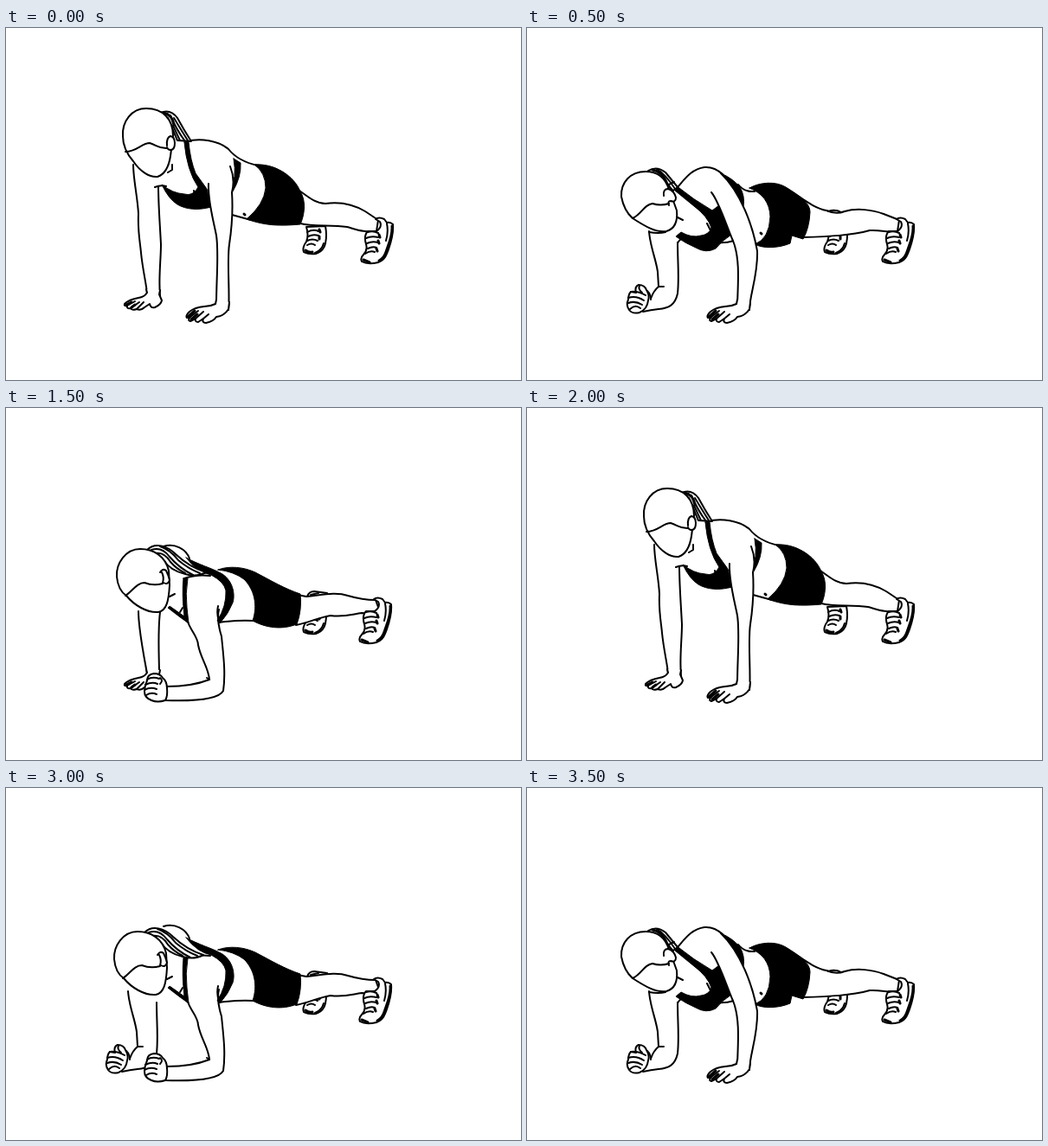
Recreate the animation shown at these times as an HTML page. Size 595 px wide and 407 px high, loop 4000 ms.

```html
<!DOCTYPE html>
<html lang="en">
<head>
<meta charset="utf-8">
<title>Up-down plank</title>
<style>
  html, body { margin: 0; width: 100%; height: 100%; overflow: hidden; background: #fff; }
  svg { display: block; width: 595px; height: 407px; }
  path { fill: none; stroke: #000; stroke-width: 2; stroke-linecap: round; stroke-linejoin: round; }
  .skin { fill: #fff; }
  .cover { fill: #fff; stroke: none; }
  .ink { fill: #000; stroke-width: 1; }
  .bold { stroke-width: 3; }
  .pose { visibility: hidden; animation: 4s step-end infinite; }
  #high { animation-name: high; }
  #left { animation-name: left; }
  #low { animation-name: low; }
  #right { animation-name: right; }
  @keyframes high {
    0%, 50% { visibility: visible; }
    12.5%, 62.5%, 100% { visibility: hidden; }
  }
  @keyframes left {
    0%, 25% { visibility: hidden; }
    12.5%, 87.5%, 100% { visibility: visible; }
  }
  @keyframes low {
    0%, 37.5%, 87.5%, 100% { visibility: hidden; }
    25%, 75% { visibility: visible; }
  }
  @keyframes right {
    0%, 50%, 75%, 100% { visibility: hidden; }
    37.5%, 62.5% { visibility: visible; }
  }
</style>
</head>
<body>
<svg viewBox="0 0 595 407">
  <defs>
    <g id="shoe">
      <path class="skin" d="M427 221Q431 218 437 221L440 225Q444 224 447 227C448 238 444 251 440 261Q437 269 430 271Q418 274 411 270Q409 266 413 262Q418 257 416 250Q413 240 418 235L428 235Q435 230 432 224Z"/>
      <path class="bold" d="M446 229C447 240 442 250 439 259Q437 266 431 269"/>
      <path d="M440 226Q442 236 439 246M418 236Q424 234 430 237M416 243Q422 240 430 242M417 249Q423 246 430 248M418 255Q424 252 428 254M415 261Q421 257 426 259"/>
      <path class="bold" d="M431 239L432 242M430 246L431 249M428 255L429 258M413 268L420 271"/>
    </g>
    <g id="back-shoe">
      <path class="skin" d="M347 230Q350 240 347 247Q342 254 344 259Q350 262 358 261Q367 258 369 249Q371 240 369 229Z"/>
      <path d="M348 236Q355 232 361 235M349 241Q355 238 361 240M348 246Q354 243 360 246M348 251Q353 248 357 251M367 249Q365 257 357 260"/>
      <path class="bold" d="M362 233L363 236M362 241L362 244M346 257Q350 260 354 259"/>
    </g>
    <g id="far-hand">
      <path class="skin" d="M162 302L163 306Q160 311 153 312Q142 314 137 319Q136 322 140 321Q139 325 144 324Q145 327 151 325Q156 327 160 323L166 319Q167 324 172 323Q179 320 180 315L177 308L178 303"/>
      <path d="M140 321L149 316M144 324L154 317M151 325L159 317"/>
      <path class="bold" d="M139 320L145 317M145 323L149 320"/>
    </g>
    <g id="near-hand">
      <path class="skin" d="M243 314L242 319Q236 322 229 322Q218 323 212 328Q207 333 209 335L213 334Q209 338 213 339L219 336Q218 340 222 340L228 336Q226 341 231 341Q240 339 243 334Q252 333 257 325L258 317"/>
      <path d="M213 334L222 327M219 336L228 328M228 336L234 331"/>
      <path class="bold" d="M210 334L218 327M214 337L221 331"/>
    </g>
    <g id="far-forearm">
      <path class="cover" d="M141 235L152 298L140 304L134 328L157 324L173 309L174 246Z"/>
      <path d="M141 235C142 252 149 267 151 282L152 299Q146 304 143 313M152 299L158 299M174 248C174 270 176 289 174 307C171 321 163 324 152 325Q143 326 134 328"/>
      <path class="skin" d="M126 306Q124 299 129 297Q136 297 138 303Q142 309 140 315Q139 325 130 329Q122 331 118 326Q114 320 117 314Q117 308 120 305Z"/>
      <path d="M120 305Q128 304 137 309M117 312Q126 309 135 315M117 318Q125 315 133 320M119 325Q125 319 131 324M130 298Q128 302 133 306M139 304Q143 308 143 314"/>
    </g>
    <g id="far-arm">
      <path class="skin" d="M153 235C153 255 158 280 163 307L177 309C177 288 175 260 178 236"/>
    </g>
    <g id="bent-arm">
      <path class="cover" d="M207 197Q222 191 236 195L250 213L247 232L248 262L251 325L234 314L222 275L210 245Z"/>
      <path class="skin" d="M210 247C213 257 222 265 222 274C225 290 234 300 235 314C220 320 202 322 186 322L184 338C212 339 245 338 251 327C254 306 251 285 249 264Q243 245 246 233"/>
      <path d="M235 314L232 312M245 229Q243 238 246 246"/>
      <path class="skin" d="M163 315Q163 308 171 307Q178 307 181 312Q186 316 186 324Q187 333 184 338Q175 341 168 338Q160 335 160 328Q160 322 163 315Z"/>
      <path d="M163 314Q169 310 177 313M161 320Q169 316 175 319M160 326Q167 322 174 325M162 332Q168 328 174 331M178 312Q182 315 178 319"/>
    </g>
    <g id="low-legs">
      <path class="skin" d="M348 218Q350 212 356 212L371 214Q372 218 366 221"/>
      <use href="#back-shoe"/>
      <path class="skin" d="M326 214L347 218C362 217 380 212 395 217Q412 222 427 222L431 233Q420 238 411 237C398 239 390 242 375 240C362 242 350 248 335 251Z"/>
      <path d="M352 216L361 214"/>
      <use href="#shoe" x="-2"/>
    </g>
    <g id="low-body">
      <path class="cover" d="M184 166Q198 157 212 174L250 190L290 200L286 246L246 248L210 247L188 230Z"/>
      <path d="M182 160C195 156 208 163 212 174M246 248Q266 245 287 246"/>
      <path class="ink" d="M245 187C258 182 275 184 288 190C307 200 322 209 340 215Q342 234 336 250C318 257 300 254 285 246C291 228 287 210 275 198Q263 189 245 187Z"/>
    </g>
    <g id="low-top">
      <path class="ink" d="M208 173C222 181 238 185 250 192C262 200 265 215 262 225Q257 238 247 249L244 246Q255 229 254 211Q252 201 237 193Q221 190 208 173Z"/>
      <path d="M206 197Q220 192 236 194"/>
      <path class="ink" d="M205 197L210 197Q207 215 209 231L211 249L200 241L187 231L189 229L206 241Q203 215 205 197Z"/>
      <path d="M201 236L204 231"/>
    </g>
    <g id="low-head">
      <path class="skin" d="M163 164C172 155 186 159 196 169Q212 184 231 190Q220 196 207 192Q190 188 182 176"/>
      <path d="M168 164Q180 160 189 172Q200 185 216 193M172 168Q183 166 190 178Q197 186 207 191M178 160Q190 164 199 176Q211 186 224 191"/>
      <path class="skin" d="M188 188C184 171 170 163 155 163C138 163 127 180 128 195C129 206 133 213 139 217C148 228 163 237 176 236C186 234 188 222 189 205Z"/>
      <path d="M138 217C146 212 151 202 160 202Q170 206 181 203M189 218L195 215"/>
      <path class="skin" d="M178 190Q181 185 185 188Q188 194 189 199Q187 205 182 202M180 190Q183 196 181 202"/>
    </g>
  </defs>

  <g class="pose" id="high">
    <use href="#back-shoe"/>
    <path class="skin" d="M147 158C147 175 152 195 153 215C152 235 155 248 156 260C158 280 162 295 163 307L178 309C176 290 179 268 179 250C178 230 176 205 176 183"/>
    <use href="#far-hand"/>
    <path class="cover" d="M188 160L207 132Q240 124 258 142L272 156L295 162L340 190L341 226L280 222L235 206L180 182Z"/>
    <path class="skin" d="M339 188C350 196 358 203 369 203C390 200 405 206 415 212L430 222L428 235C415 237 405 233 394 230C375 227 356 230 340 226"/>
    <use href="#shoe"/>
    <path d="M172 184Q179 181 185 183M261 216L283 222M208 131C225 127 245 130 257 140Q268 154 291 159M192 158L192 164L187 167"/>
    <path class="ink" d="M287 158C310 156 333 171 340 189C347 200 345 216 340 227C318 229 300 229 278 221Q298 204 300 185Q300 167 287 158Z"/>
    <path class="bold" d="M275 215L276 216"/>
    <path class="ink" d="M206 132L211 132Q213 153 219 168L232 186L237 207C222 211 208 210 198 204Q188 198 180 181Q192 191 206 192Q216 195 222 184Q209 165 206 132Z"/>
    <path d="M217 188L218 193"/>
    <path class="ink" d="M263 151L271 156Q272 172 262 189L259 189Q267 173 263 151Z"/>
    <path class="skin" d="M234 180C233 200 240 224 243 240C246 260 243 290 243 319L257 326C259 309 255 270 258 250C261 230 262 205 261 190Q265 175 259 160"/>
    <use href="#near-hand"/>
    <path class="skin" d="M178 98Q190 93 198 104Q205 117 214 131L198 130L187 104"/>
    <path class="bold" d="M182 98Q192 100 194 112"/>
    <path d="M190 101Q197 118 207 131M194 104Q203 119 210 130M193 113L201 130"/>
    <path class="skin" d="M193 125C193 105 181 93 162 93C145 93 134 108 135 125C135 137 140 146 147 154C155 166 166 173 175 172Q187 168 190 148Z"/>
    <path d="M138 143C151 143 157 133 166 133C175 136 178 140 187 139"/>
    <path class="skin" d="M186 136Q185 127 190 125Q195 126 195 133Q195 141 190 141Q187 141 186 138"/>
  </g>

  <g class="pose" id="left">
    <use href="#back-shoe"/>
    <use href="#far-forearm"/>
    <path class="cover" d="M174 185Q195 157 212 161L250 187L300 185L304 249L264 250L207 256L178 242L172 215Z"/>
    <path class="skin" d="M300 186C316 195 330 208 346 211Q357 216 367 212C381 208 399 210 412 215L430 222L428 235C420 238 410 233 396 234C374 240 350 241 318 242"/>
    <path d="M348 212Q356 209 363 213"/>
    <use href="#shoe"/>
    <path d="M174 184C182 175 190 163 205 161Q216 160 226 169M244 181Q251 190 263 189M219 248Q229 249 239 246M174 219L180 222M141 236Q152 238 160 236M174 249Q176 244 181 243"/>
    <path class="ink" d="M257 185C269 178 288 177 299 184C315 194 327 202 327 213Q326 232 319 244L306 240L304 249C290 255 272 255 263 250Q280 244 281 218Q280 194 257 185Z"/>
    <path class="bold" d="M270 237L271 238"/>
    <path class="ink" d="M172 182Q193 199 214 211L222 205L236 239Q225 246 218 255Q207 261 195 254Q183 249 172 241L178 236Q190 243 201 240Q210 239 213 231Q209 218 193 206L171 188Z"/>
    <path d="M208 226L212 234"/>
    <path class="ink" d="M224 168Q238 174 246 184Q252 194 250 207L238 190Z"/>
    <path class="skin" d="M213 190C221 199 231 230 238 246C246 266 244 292 243 319L257 326C257 309 267 286 266 258C261 229 247 190 224 168"/>
    <use href="#near-hand"/>
    <path class="skin" d="M140 165Q150 159 160 167L174 184L169 188L156 177"/>
    <path class="bold" d="M145 164Q156 166 161 178"/>
    <path d="M150 163Q160 169 171 186M155 169L168 188M164 181L170 178"/>
    <path class="skin" d="M164 187C160 173 151 166 137 166C119 166 108 179 109 195Q112 211 122 220C136 229 149 237 161 235Q175 231 173 211L168 197Z"/>
    <path d="M122 220C133 215 135 204 145 203Q154 206 164 203"/>
    <path class="skin" d="M158 194Q157 186 163 186Q170 188 172 196Q172 202 166 200Q162 200 164 205"/>
  </g>

  <g class="pose" id="low">
    <use href="#low-legs"/>
    <use href="#far-forearm"/>
    <use href="#low-body"/>
    <use href="#bent-arm"/>
    <use href="#low-top"/>
    <use href="#low-head" x="-3" y="3"/>
  </g>

  <g class="pose" id="right">
    <use href="#low-legs"/>
    <use href="#far-arm"/>
    <use href="#far-hand"/>
    <use href="#low-body"/>
    <use href="#bent-arm"/>
    <use href="#low-top"/>
    <use href="#low-head"/>
  </g>
</svg>
</body>
</html>
```
